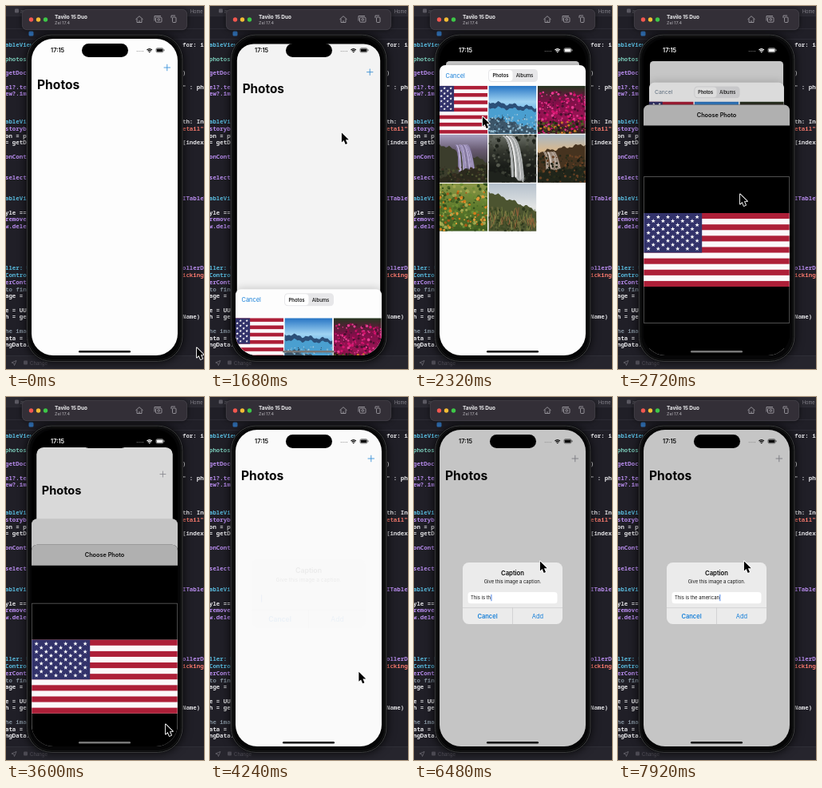
Animation of 248 by 454 pixels, one loop 8 s. Source, as an HTML page with a canvas:

```html
<!DOCTYPE html>
<html lang="en">
<head>
<meta charset="utf-8">
<title>Photo caption demo</title>
<style>
html, body { margin: 0; width: 100%; height: 100%; overflow: hidden; background: #201f27; }
canvas { display: block; width: 248px; height: 454px; }
</style>
</head>
<body>
<canvas id="stage"></canvas>
<script>
const W = 248, H = 454, LOOP = 8000;
const cv = document.getElementById('stage');
const dpr = window.devicePixelRatio || 1;
cv.width = W * dpr;
cv.height = H * dpr;
const c = cv.getContext('2d');
const SANS = 'Inter, "Liberation Sans", sans-serif';
const MONO = '"Noto Sans Mono", "DejaVu Sans Mono", monospace';
const BLUE = '#167fd8';
const SX = 32, SY = 41, SW = 183, SH = 396, MID = SX + SW / 2;
const SHEET = 74, BOTTOM = SY + SH, CELL = 60;
const TOP_ROUND = [7, 7, 0, 0];

const clamp = x => Math.max(0, Math.min(1, x));
const mix = (a, b, k) => a + (b - a) * k;
const smooth = (t, a, b) => { const k = clamp((t - a) / (b - a)); return k * k * (3 - 2 * k); };
// critically damped spring from 0 to 1
const spring = (t, start) => {
  const k = Math.max(0, t - start) * 0.017;
  return 1 - (1 + k) * Math.exp(-k);
};
function random(seed) {
  return () => (seed = (seed * 16807) % 2147483647) / 2147483647;
}

function rect(x, y, w, h, fill) { c.fillStyle = fill; c.fillRect(x, y, w, h); }
function box(x, y, w, h, r, fill) {
  c.beginPath();
  c.roundRect(x, y, w, h, r);
  c.fillStyle = fill;
  c.fill();
}
function ring(x, y, w, h, r, color, width) {
  c.beginPath();
  c.roundRect(x, y, w, h, r);
  c.strokeStyle = color;
  c.lineWidth = width;
  c.stroke();
}
function disc(x, y, r, fill) { c.beginPath(); c.arc(x, y, r, 0, 7); c.fillStyle = fill; c.fill(); }
function text(s, x, y, size, fill, weight = 400, align = 'left', font = SANS) {
  c.font = `${weight} ${size}px ${font}`;
  c.textAlign = align;
  c.fillStyle = fill;
  c.fillText(s, x, y);
}
function outline(d, color, width) {
  c.strokeStyle = color;
  c.lineWidth = width;
  c.stroke(new Path2D(d));
}
function layer(draw) { c.save(); draw(); c.restore(); }
function shadow(color, blur) { c.shadowColor = color; c.shadowBlur = blur * dpr; }
function zoom(x, y, k) { c.translate(x, y); c.scale(k, k); c.translate(-x, -y); }

// ---- editor and simulator window ----
const INK = { w: '#e3e3e6', p: '#b88cee', t: '#78c8b6', b: '#58b9dc', g: '#7f8c98', r: '#f4786c' };
// each line: ink and left text, then optionally ink and right text
const CODE = `bableView|wfor: index

tphotos

pgetDocum|w)

pel?.text|w" : photo
pew?.imag



bableView|wth: Index
pstoryboa|retail",
won = pho
w= getDoc|w[indexP

ponContro


pselected


bableView|pITableVi

wyle == .
premove(a
pw.delete





bller: UI|pollerDel
bControll|ricking"
perContro
gto find 
wage = in

we = UUID
wh = getD|wName)

ghe image
wata = im
wngData.w`.split('\n');

function editor() {
  rect(0, 0, W, H, '#201f27');
  rect(0, 0, W, 12, '#2a2931');
  box(11, 3.5, 5, 5, 1.2, '#5b5962');
  text('app', 18, 8.5, 5.5, '#6b6972');
  text('Home', 231, 8.5, 5.5, '#8a8891');
  [12, 28, 41].forEach(y => rect(0, y, W, 0.6, '#35343c'));
  box(28.5, 31.5, 6, 6, 1.5, '#2f6cae');
  CODE.forEach((row, i) => row.split('|').forEach((s, side) =>
    text(s.slice(1), side ? 221 : -1, 51.4 + i * 8.72, 7.4, INK[s[0]], 600, 'left', MONO)));
  rect(0, 437, W, 17, '#26252d');
  rect(0, 437, W, 0.6, '#35343c');
  outline('M7 446l6-2.5-2.5 6-.8-2.7z', '#6b6972', 0.8);
  box(22, 443.5, 5, 5, 1, '#4c4a53');
  text('Change', 30, 448.5, 6, '#55535c');
}

function toolbar() {
  layer(() => {
    shadow('rgba(0,0,0,.6)', 6);
    box(20, 4, 207, 26, 6, '#332f37');
  });
  ring(20.3, 4.3, 206.4, 25.4, 6, '#4b4850', 0.6);
  ['#f2574f', '#f4bc34', '#3dc748'].forEach((f, i) => disc(31.5 + 9 * i, 17, 2.7, f));
  text('Tavilo 15 Duo', 61, 16.2, 6.4, '#f4f4f6', 700);
  text('Zel 17.4', 61, 23, 5.4, '#b5b3b9');
  const g = '#aaa8ae';
  outline('M162.5 16.7l4.5-4 4.5 4M164 16v4.5h6V16M167 20.5V18', g, 0.8);
  outline('M186 18.5v-6h8', g, 0.8);
  ring(187.5, 14.2, 7.5, 6, 1, g, 0.8);
  ring(190, 15.7, 2.6, 2.6, 1.3, g, 0.8);
  ring(208.5, 14, 4.5, 6.5, 1, g, 0.8);
  outline('M207 15v-3h5', g, 0.8);
}

function phoneBody() {
  layer(() => {
    shadow('rgba(0,0,0,.85)', 12);
    box(26, 35.5, 195.5, 409.5, 31, '#060607');
  });
  ring(26.6, 36.1, 194.3, 408.3, 30.5, '#4d4f50', 0.8);
  ring(28.6, 38, 190.3, 404.4, 28.5, '#1c1d1e', 0.8);
}

// ---- pictures ----
function star(x, y, r) {
  c.beginPath();
  for (let i = 0; i < 10; i++) {
    const a = Math.PI * (i / 5 - 0.5), q = i % 2 ? r * 0.4 : r;
    c.lineTo(x + q * Math.cos(a), y + q * Math.sin(a));
  }
  c.fill();
}
function flag(x, y, w, h) {
  const s = h / 13, cw = w * 0.4, ch = s * 7;
  rect(x, y, w, h, '#fbf8fa');
  for (let i = 0; i < 13; i += 2) rect(x, y + i * s, w, s, '#ad1f38');
  rect(x, y, cw, ch, '#32326a');
  c.fillStyle = '#fff';
  for (let r = 0; r < 9; r++)
    for (let i = 0; i < 6 - r % 2; i++)
      star(x + cw * (2 * i + 1 + r % 2) / 12, y + ch * (r + 1) / 10, h * 0.031);
}
function shade(...colors) {
  const g = c.createLinearGradient(0, 0, 0, CELL);
  colors.forEach((f, i) => g.addColorStop(i / (colors.length - 1), f));
  rect(0, 0, CELL, CELL, g);
}
// rough ground filling everything below a slope
function hill(left, right, fill) {
  c.beginPath();
  c.moveTo(0, CELL);
  for (let x = 0; x <= CELL; x += 2)
    c.lineTo(x, mix(left, right, x / CELL) + 1.5 * Math.sin(x * 0.35) + Math.sin(x * 0.9));
  c.lineTo(CELL, CELL);
  c.fillStyle = fill;
  c.fill();
}
function fall(x, width, lean, top, end, colors) {
  const rnd = random(7);
  for (let i = 0; i < 60; i++) {
    const u = rnd() * width;
    outline(`M${x + u} ${top}Q${x + u + lean} ${top + 4} ${x + lean + u * 1.3} ${end - rnd() * 8}`, colors[i % colors.length], 0.9);
  }
}
function specks(seed, n, top, size, ...colors) {
  const rnd = random(seed);
  for (let i = 0; i < n; i++)
    disc(rnd() * CELL, mix(top, CELL, rnd()), size * (0.4 + rnd() * 0.8), colors[i % colors.length]);
}
function grass(n, top, ...colors) {
  const rnd = random(53);
  for (let i = 0; i < n; i++)
    outline(`M${rnd() * CELL} ${mix(top, CELL, rnd())}l${rnd() * 6 - 3} ${-4 - rnd() * 7}`, colors[i % colors.length], 0.7);
}
const PICS = [
  () => flag(-29.5, 0, 119, 60),
  () => {
    shade('#2674c4', '#9fd3f2', '#4aa0dc', '#2f7fb8');
    hill(20, 27, '#2b4f78');
    hill(27, 31, '#4a9fd0');
    hill(38, 54, '#3c5568');
    specks(9, 120, 36, 1.3, '#7fb4d0', '#2a4256', '#5c7d92', '#a5c9dc');
  },
  () => {
    shade('#24361f', '#7d1048', '#9c1455', '#2b2418');
    specks(21, 260, 8, 1.6, '#d4146e', '#8d0c4a', '#e83c92', '#4c1030');
    specks(5, 90, 44, 1.7, '#2c3d18', '#17200f', '#4f5c22', '#c9782a');
  },
  () => {
    shade('#a8a0c0', '#66596f', '#3c3a38', '#1c2014');
    hill(12, 34, '#3b3d2c');
    fall(20, 16, 4, 13, 50, ['#9b8fbc', '#c3b8dc', '#7c7098']);
    hill(54, 36, '#2b291d');
    specks(31, 90, 40, 1.5, '#20281a', '#4c5030', '#3a2f22');
  },
  () => {
    shade('#70756c', '#34372f', '#191c18', '#151714');
    specks(12, 130, 0, 2, '#1e221c', '#3c4036', '#55594e');
    fall(18, 12, 11, 2, 60, ['#f0f0f0', '#b9bcbc', '#8c9090']);
    hill(44, 64, '#1f231d');
  },
  () => {
    shade('#a9b8c4', '#d8b88e', '#4a3826', '#201d14');
    hill(22, 12, '#46331f');
    fall(8, 14, 3, 22, 46, ['#d8ccc4', '#a89888', '#8a7868']);
    hill(46, 40, '#20251a');
    specks(17, 130, 26, 1.5, '#2a2c1a', '#6a4224', '#1a1d14');
  },
  () => {
    shade('#8c9848', '#5d7a2c', '#3c5a20');
    specks(41, 190, 0, 2, '#6d8c34', '#33501c', '#a3a850', '#4c6a26');
    specks(47, 70, 10, 1.6, '#d07c1c', '#a85a18', '#e09a38');
  },
  () => {
    shade('#b4c0cc', '#e2e4e4', '#b4b4a4');
    hill(10, 34, '#4c5430');
    specks(57, 90, 32, 1.8, '#3c4824', '#5f6838', '#2c361c');
    grass(130, 38, '#7c8444', '#36441f', '#96864c', '#a0603c');
  }
];
function grid(x, y) {
  PICS.forEach((draw, i) => layer(() => {
    c.translate(x + (i % 3) * 61.4, y + Math.floor(i / 3) * 61);
    c.beginPath();
    c.rect(0, 0, CELL, CELL);
    c.clip();
    draw();
  }));
}

// ---- app screens ----
function home(p, dim, grey) {
  layer(() => {
    const r = p > 0.01 ? mix(26, 5, p) : 0;
    c.translate(0, 28 * p);
    zoom(MID, SY, 1 - 0.087 * p);
    box(SX, SY, SW, SH, r, '#fdfdfd');
    text('Photos', 39, 104.3, 15.6, '#050505', 700);
    outline('M197.6 77h8.4M201.8 72.8v8.4', grey ? '#9d9da6' : '#3c94dc', 0.9);
    box(SX, SY, SW, SH, r, `rgba(0,0,0,${dim})`);
  });
}

function picker(y, inner, gap) {
  layer(() => {
    c.translate(0, y + 23 * inner);
    zoom(MID, 0, 1 - 0.081 * inner);
    layer(() => {
      shadow('rgba(0,0,0,.22)', 12);
      box(SX, 0, SW, 370, TOP_ROUND, '#fdfdfd');
    });
    text('Cancel', 39.5, 15.8, 7.4, inner > 0.5 ? '#6d7f92' : BLUE);
    box(93, 5, 62, 16, 4.5, '#e7e7e9');
    box(94, 6, 29.5, 14, 4, '#fff');
    text('Photos', 108.5, 15.3, 6, '#111', 600, 'center');
    text('Albums', 138.5, 15.3, 6, '#111', 500, 'center');
    grid(SX, gap);
    box(SX, 0, SW, 370, TOP_ROUND, `rgba(0,0,0,${0.14 * inner})`);
  });
}

function cropper(y, height) {
  const mid = y + height / 2, low = y + height - 20;
  box(SX, y, SW, 440, TOP_ROUND, '#000');
  box(SX, y, SW, 26, TOP_ROUND, '#b0b0b0');
  text('Choose Photo', 123.5, y + 15.6, 7.3, '#0a0a0a', 600, 'center');
  flag(SX, mid - 46, SW, 92);
  ring(SX + 0.4, mid - 91.5, SW - 0.8, 183, 0, 'rgba(190,190,190,.6)', 0.7);
  text('Cancel', 40, low, 7.5, '#fff');
  text('Choose', 207, low, 7.5, '#fff', 400, 'right');
}

function alertBox(k, t) {
  const message = 'This is the american';
  const typed = message.slice(0, Math.max(0, 1 + Math.floor((t - 5050) / 148)));
  layer(() => {
    c.globalAlpha = k;
    zoom(123.5, 245.5, mix(1.15, 1, k));
    box(61, 207, 125, 77, 7.5, '#ebebeb');
    text('Caption', 123.5, 223.3, 7.7, '#0a0a0a', 600, 'center');
    text('Give this image a caption.', 123.5, 232.8, 5.9, '#151515', 400, 'center');
    box(67.5, 244, 112, 14.3, 3.5, '#fff');
    text(typed, 71, 253.4, 5.9, '#111');
    const end = 71.4 + c.measureText(typed).width;
    if (t > 5000 || t % 1000 < 600) rect(end, 247, 0.9, 8.2, '#3b76e0');
    rect(61, 263.5, 125, 0.6, '#c3c3c5');
    rect(123.3, 263.5, 0.6, 20.5, '#c3c3c5');
    text('Cancel', 92, 277, 7.5, BLUE, 600, 'center');
    text('Add', 155, 277, 7.5, BLUE, 400, 'center');
  });
}

function statusBar(ink) {
  box(95, 47, 58, 17, 8.5, '#000');
  text('17:15', 56, 58.2, 7.4, ink, 600);
  for (let i = 0; i < 4; i++) disc(164.3 + i * 2.4, 56.6, 0.6, '#8a8a8a');
  c.strokeStyle = ink;
  c.lineWidth = 1.2;
  for (let r = 1.2; r < 5; r += 1.8) {
    c.beginPath();
    c.arc(179.7, 58.6, r, -2.3, -0.84);
    c.stroke();
  }
  ring(188, 52.7, 9, 5.2, 1.5, ink, 0.5);
  box(188.7, 53.4, 7.6, 3.8, 0.9, ink);
  rect(197.6, 54.4, 0.7, 1.8, ink);
}

// ---- pointer: start, duration, place ----
const MOVES = [
  [120, 1080, 201, 75], [1500, 180, 164, 157], [1680, 440, 85, 137],
  [2430, 290, 152, 234], [2720, 530, 199, 408], [3900, 900, 157, 204]
];
const ARROW = 'M.5.5v12.1l2.7-2.4 2.1 4.8 2.3-1-2.1-4.7h3.9z';
function pointer(t) {
  let x = 238, y = 426;
  for (const [start, span, toX, toY] of MOVES) {
    const k = smooth(t, start, start + span);
    x = mix(x, toX, k);
    y = mix(y, toY, k);
  }
  layer(() => {
    c.translate(x + 0.4, y + 0.9);
    c.lineJoin = 'round';
    outline(ARROW, '#fff', 1.8);
    c.fillStyle = '#000';
    c.fill(new Path2D(ARROW));
  });
}

function screen(t) {
  const closing = t > 3550;
  const p = closing ? 1 - spring(t, 3550) : spring(t, 1628);
  const inner = closing ? 1 : spring(t, 2442);
  const pop = smooth(t, 4200, 4480);
  const y = mix(BOTTOM, SHEET, p);
  const cropping = inner > 0.5 && p > 0.1;
  const overPics = y + 26 < 431 && y + 210 > 431;

  layer(() => {
    c.beginPath();
    c.roundRect(SX, SY, SW, SH, 27);
    c.clip();
    rect(SX, SY, SW, SH, '#000');
    home(p, mix(0.18, 0.22, closing ? 0 : inner) * p, (t > 2000 && t < 3800) || pop > 0.3);
    if (p > 0.002) {
      if (closing) box(SX, y, SW, 400, TOP_ROUND, '#c5c5c5');
      else picker(y, inner, mix(36, 25.7, smooth(t, 1700, 1950)));
      if (inner > 0.002) {
        const top = closing ? y + 32.5 : mix(BOTTOM, SHEET + 33, inner);
        cropper(top, mix(363, 330, smooth(t, 2740, 2960)));
      }
    }
    rect(SX, SY, SW, SH, `rgba(0,0,0,${0.225 * pop})`);
    statusBar(p > 0.5 ? '#fff' : '#080808');
    if (pop > 0) alertBox(pop, t);
    box(91, 431, 65, 2.6, 1.3, cropping || overPics ? '#777' : '#080808');
  });
}

const begin = performance.now();
function frame(now) {
  const t = Math.max(0, now - begin) % LOOP;
  c.setTransform(dpr, 0, 0, dpr, 0, 0);
  editor();
  phoneBody();
  toolbar();
  screen(t);
  pointer(t);
  requestAnimationFrame(frame);
}
requestAnimationFrame(frame);
</script>
</body>
</html>
```
